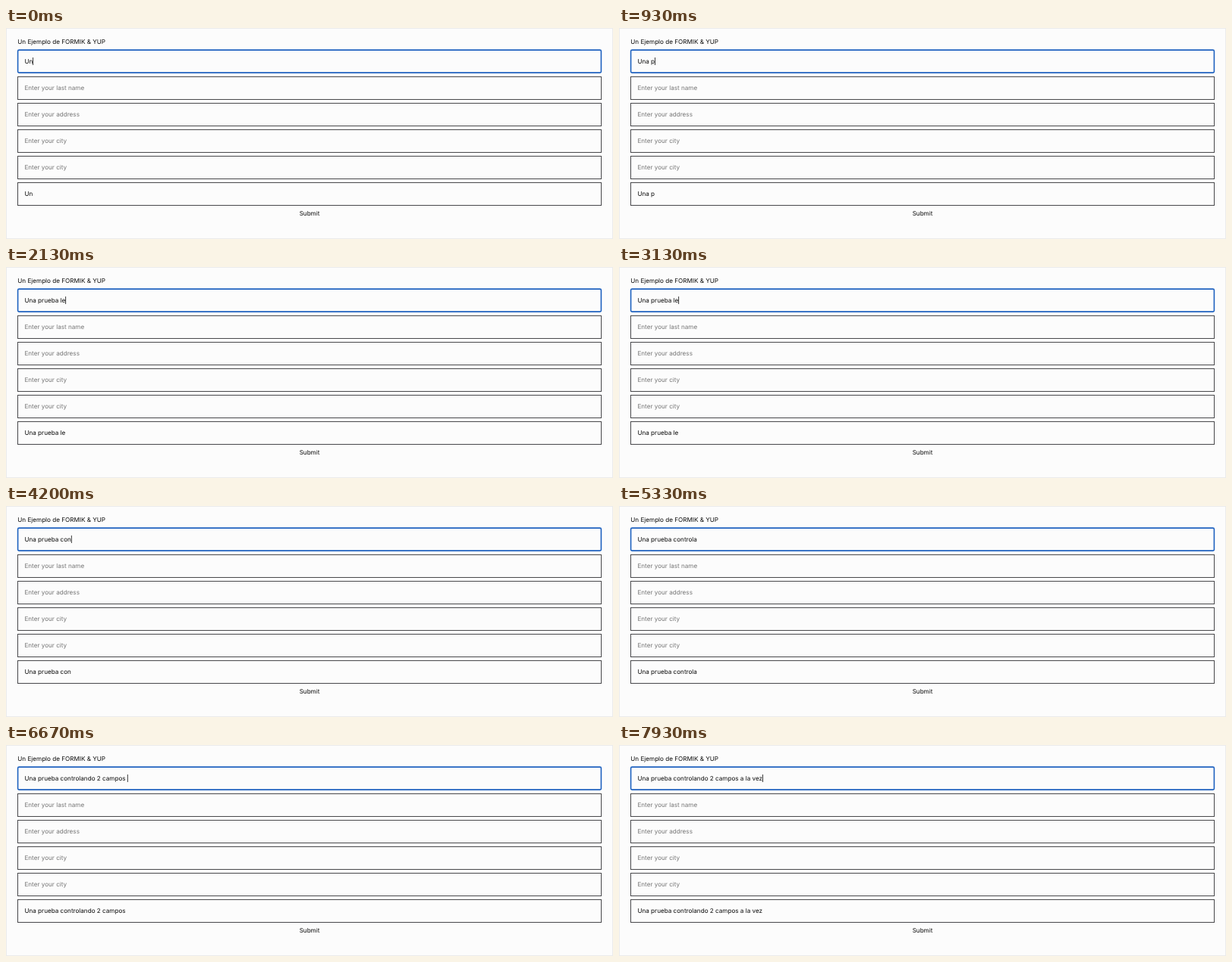
An HTML page with a canvas for the animation above (8000 ms loop, 800 px wide and 279 px high).

```html
<!DOCTYPE html>
<html lang="es">
<head>
<meta charset="utf-8">
<title>Formulario</title>
<style>
  html, body { margin: 0; width: 100%; height: 100%; overflow: hidden; background: #fcfcfc; }
  canvas { display: block; width: 800px; height: 279px; }
</style>
</head>
<body>
<canvas id="stage"></canvas>
<script>
const W = 800, H = 279, LOOP = 8000;
const canvas = document.getElementById('stage');
const ctx = canvas.getContext('2d');
const dpr = window.devicePixelRatio || 1;
canvas.width = W * dpr;
canvas.height = H * dpr;

const FONT = '8.15px Inter, "Open Sans", sans-serif';
const INK = '#0c0c0c', HINT = '#767676', BORDER = '#48484b', FOCUS = '#1f62c0';
const LEFT = 15, RIGHT = 785, FIRST_ROW = 29, PITCH = 35, TEXT_X = 24.4;
const HINTS = ['Enter your last name', 'Enter your address', 'Enter your city', 'Enter your city'];

// Bursts of keys with their press times; "<" is a backspace.
const BURSTS = [
  ['a ', [70, 130]],
  ['prueba ', [930, 1070, 1130, 1200, 1330, 1400, 1470]],
  ['le', [2070, 2130]],
  ['t', [3470]],
  ['<<<c', [3730, 3800, 3870, 3930]],
  ['ontro', [4070, 4200, 4270, 4330, 4400]],
  ['la', [4600, 4730]],
  ['ndo ', [5670, 5730, 5800, 5930]],
  ['2 ', [6070, 6130]],
  ['campos ', [6270, 6330, 6400, 6470, 6530, 6600, 6670]],
  ['a la vez', [7400, 7470, 7530, 7600, 7670, 7730, 7870, 7930]]
];
const CARET_OFF = [[600, 930], [1930, 2070], [2600, 2930], [5330, 5670], [7200, 7400]];

function typedText(time) {
  let text = 'Un';
  for (const [keys, times] of BURSTS) {
    times.forEach((at, i) => {
      if (time >= at) text = keys[i] === '<' ? text.slice(0, -1) : text + keys[i];
    });
  }
  return text;
}

function label(text, x, baseline, color = INK, align = 'left') {
  ctx.fillStyle = color;
  ctx.textAlign = align;
  ctx.fillText(text, x, baseline);
}

function field(row, text, color) {
  const y = FIRST_ROW + row * PITCH;
  ctx.strokeStyle = BORDER;
  ctx.lineWidth = 1;
  ctx.strokeRect(LEFT + 0.5, y + 0.5, RIGHT - LEFT - 1, 30);
  label(text, TEXT_X, y + 18, color);
}

function focusedField(text, caretOn) {
  ctx.strokeStyle = FOCUS;
  ctx.lineWidth = 1.6;
  ctx.beginPath();
  ctx.roundRect(LEFT + 0.6, FIRST_ROW + 0.1, RIGHT - LEFT - 1.2, 30, 1.6);
  ctx.stroke();
  label(text, TEXT_X, FIRST_ROW + 18);
  if (caretOn) {
    ctx.fillStyle = INK;
    ctx.fillRect(TEXT_X + ctx.measureText(text).width, 39, 0.8, 10);
  }
}

function draw(time) {
  ctx.setTransform(dpr, 0, 0, dpr, 0, 0);
  ctx.fillStyle = '#fcfcfc';
  ctx.fillRect(0, 0, W, H);
  ctx.strokeStyle = '#ebebeb';
  ctx.lineWidth = 1;
  ctx.strokeRect(0.5, 0.5, W - 1, H - 1);

  ctx.font = FONT;
  ctx.textRendering = 'geometricPrecision';
  ctx.textBaseline = 'alphabetic';

  const text = typedText(time);
  const caretOn = !CARET_OFF.some(([from, to]) => time >= from && time < to);
  label('Un Ejemplo de FORMIK & YUP', 15.3, 21);
  focusedField(text, caretOn);
  HINTS.forEach((hint, i) => field(i + 1, hint, HINT));
  field(5, text, INK);
  label('Submit', W / 2, 248.4, INK, 'center');
}

const start = performance.now();
function tick() {
  draw((performance.now() - start) % LOOP);
  requestAnimationFrame(tick);
}
tick();
</script>
</body>
</html>
```
